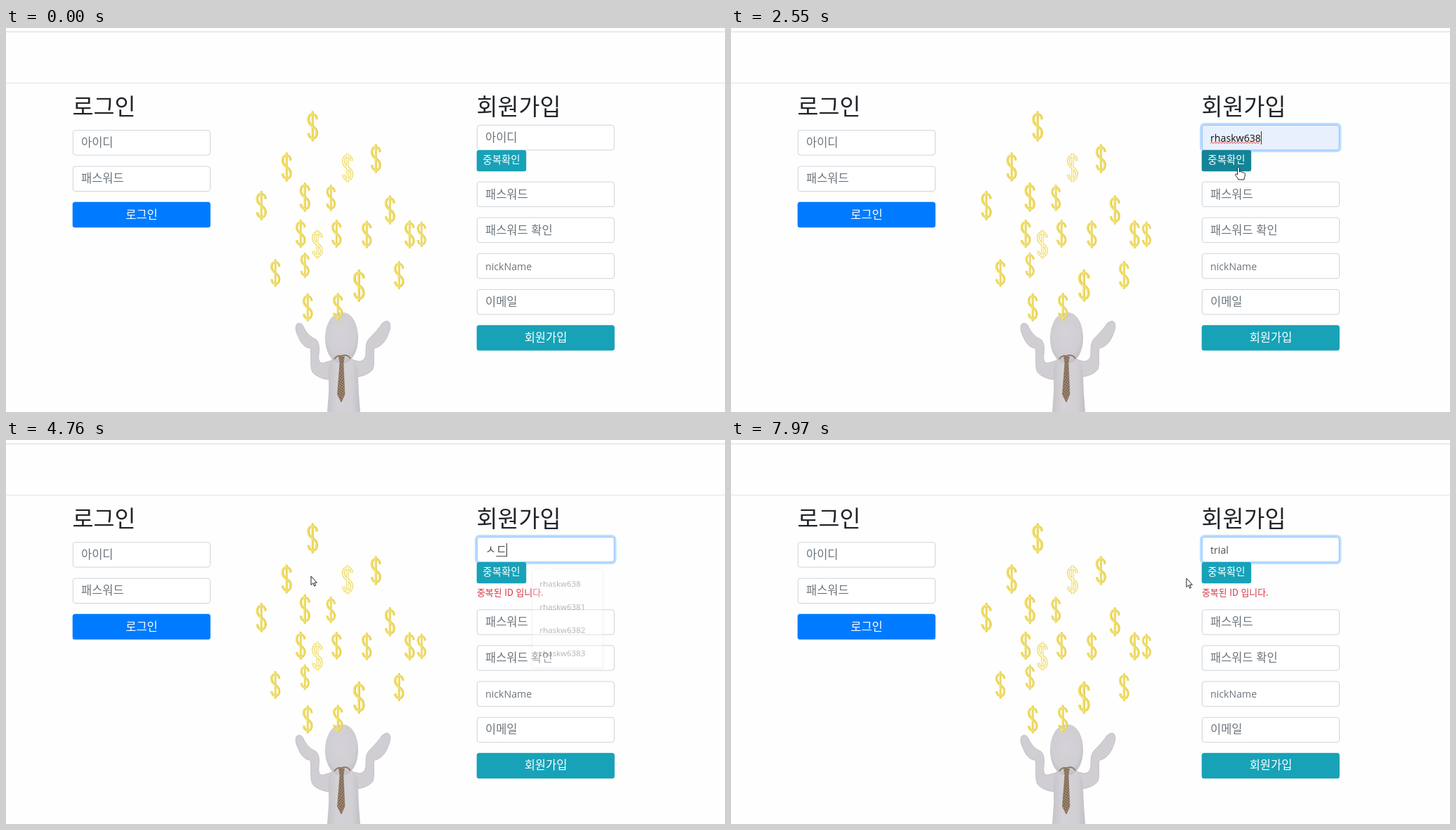
Animation of 1023x547 px, one loop 8 s. Source, as an HTML page:

```html
<!DOCTYPE html>
<html lang="ko">
<head>
<meta charset="utf-8">
<title>로그인 / 회원가입</title>
<style>
html, body { margin: 0; width: 100%; height: 100%; overflow: hidden; background: #fefefe; }
svg { display: block; width: 100%; height: 100%; }
text { font: 300 16.5px "Noto Sans CJK KR", "Noto Sans CJK JP", "Noto Sans CJK", sans-serif; fill: #212529; }
text.latin { font: 14.2px "Open Sans", "Noto Sans", sans-serif; }
text.title { font-size: 32.6px; }
text.hint { fill: #6c757d; }
text.label { fill: #fff; text-anchor: middle; }
text.small { font-size: 14.5px; }
text.error { font-size: 12.9px; fill: #d63343; }
text.item { font-size: 11.9px; }
text.item.ko { font-size: 13.2px; }
.box { fill: #fff; stroke: #ced4da; }
</style>
</head>
<body>
<svg id="stage" viewBox="0 0 1023 547">
  <defs>
    <radialGradient id="skin" cx=".48" cy=".42" r=".62">
      <stop offset="0" stop-color="#d5d3d7"/><stop offset=".7" stop-color="#d0ced2"/><stop offset="1" stop-color="#c0bdc3"/>
    </radialGradient>
    <linearGradient id="torso">
      <stop offset="0" stop-color="#c6c3c9"/><stop offset=".3" stop-color="#d4d2d6"/><stop offset=".75" stop-color="#d2d0d4"/><stop offset="1" stop-color="#c2bfc5"/>
    </linearGradient>
    <pattern id="weave" width="3" height="3" patternUnits="userSpaceOnUse" patternTransform="rotate(35)">
      <rect width="3" height="3" fill="#8a725e"/><rect width="1.5" height="1.5" fill="#bda98f"/><rect x="1.5" y="1.5" width="1.5" height="1.5" fill="#6a5341"/>
    </pattern>
    <path id="curl" d="M6.2-10C5.5-20-6.2-20-6.2-10C-6.2 1 6.2-1 6.2 10C6.2 20-5.5 20-6.2 10"/>
    <path id="bar" d="M0-22V22"/>
  </defs>

  <rect width="1023" height="547" fill="#fefefe"/>
  <path d="M0 5.5H1023" stroke="#dadbde"/>
  <path d="M0 78.5H1023" stroke="#e5e5e6"/>

  <g id="figure">
    <path d="M413 423C415 419 421 420 423 425C426 432 432 440 440 443C446 447 446 456 445 465C444 474 446 478 452 477C458 475 462 474 466 473L462 501C452 501 440 496 436 490C432 482 435 466 433 456C425 456 419 448 416 440C413 434 411 428 413 423Z
             M546 421C545 416 539 417 535 421C531 427 525 434 519 440C512 446 512 453 512 463C512 471 508 474 503 475C498 474 494 473 491 472L496 497C507 497 518 492 522 486C525 478 522 464 524 456C533 455 540 446 543 438C546 431 548 425 546 421Z" fill="#d0ced2" stroke="#c3c0c6"/>
    <path d="M464 471H493C502 478 501 500 502 520L504 547H457L459 520C460 500 456 480 464 471Z" fill="url(#torso)"/>
    <path d="M478 405C494 405 501 424 501 442C501 462 491 478 478 478C464 478 454 462 454 442C454 424 462 405 478 405Z" fill="url(#skin)"/>
    <path d="M467 472Q470 466 477 467Q486 464 490 471" fill="none" stroke="#8b705a" stroke-width="1.6"/>
    <path d="M473.5 468H481.5L480 477L482 522L477 533L471.5 522L475 477Z" fill="url(#weave)" stroke="#7a614d" stroke-width=".5"/>
  </g>
  <g id="dollars"></g>

  <g id="login"></g>
  <g id="signup">
    <g id="lower"></g>
    <text id="error" class="error" x="670" y="221.5">중복된 ID 입니다.</text>
    <rect id="idRing" x="668.5" y="136.5" width="198.5" height="39" rx="5" fill="none" stroke="#bfdeff" stroke-width="3"/>
    <rect id="idBox" class="box" x="670.3" y="138.4" width="195" height="35.4" rx="3.5"/>
    <rect id="selection" y="147" height="19" fill="#3390ff"/>
    <text id="idText" x="682" y="161.6"></text>
    <path id="squiggle" fill="none" stroke="#e5352c"/>
    <path id="underline" stroke="#495057"/>
    <path id="caret" stroke="#333"/>
    <rect id="checkRing" x="668.5" y="172.5" width="73" height="33" rx="5" fill="none" stroke="#8bd0dc" stroke-width="3"/>
    <rect id="check" x="669.7" y="174" width="70.5" height="30.2" rx="3"/>
    <text class="label small" x="705" y="193.4">중복확인</text>
  </g>
  <g id="menu"></g>

  <g id="cursor" stroke-linejoin="round">
    <path id="arrow" d="M0 0V12.5L2.8 9.8L4.8 14.2L6.6 13.3L4.7 9.2H8.4Z" fill="#fff" stroke="#222"/>
    <path id="hand" d="M-1.5 10V1C-1.5-1 1.5-1 1.5 1V6C3 5 4.5 5.5 4.5 6.5C6 6 7.5 6.5 7.5 7.5C9 7.2 9.5 8 9.5 9.5C9.5 13 8 14 8 17H0C-1 14-4 12-4.5 10C-4 8.5-2.5 9-1.5 10Z" fill="#fff" stroke="#222"/>
    <path id="beam" d="M-3-6H-1L0-5L1-6H3M0-5V5M-3 6H-1L0 5L1 6H3" fill="none" stroke="#222"/>
  </g>
</svg>
<script>
const LOOP = 8000, SHIFT = 22.6, INFO = '#17a2b8', INFO_DARK = '#138496';
const $ = id => document.getElementById(id);
const clamp = v => Math.max(0, Math.min(1, v));
const ramp = (t, start, length = 150) => clamp((t - start) / length);
const show = (id, on) => $(id).setAttribute('visibility', on ? 'visible' : 'hidden');
const set = (id, attrs) => { for (const k in attrs) $(id).setAttribute(k, attrs[k]); };
const isKorean = s => /[ㄱ-힣]/.test(s);
const fontOf = s => isKorean(s) ? 'ko' : 'latin';

const field = (x, y, hint) =>
  `<rect class="box" x="${x + .3}" y="${y + .4}" width="195.2" height="35.4" rx="3.5"/>
   <text class="hint ${fontOf(hint)}" x="${x + 12}" y="${y + 23.7}">${hint}</text>`;
const button = (x, y, label, fill, id) =>
  `<rect id="${id}" x="${x - .3}" y="${y}" width="196.2" height="36.4" rx="3.5" fill="${fill}"/>
   <text class="label" x="${x + 98}" y="${y + 23.7}">${label}</text>`;

$('login').innerHTML = '<text class="title" x="94.5" y="124">로그인</text>' +
  field(95, 145.3, '아이디') + field(95, 196.7, '패스워드') + button(95, 247.8, '로그인', '#007bff', 'enter');

const FIELDS = [[218.8, '패스워드'], [269.8, '패스워드 확인'], [321, 'nickName'], [372.2, '이메일']];
$('lower').innerHTML = FIELDS.map(([y, hint]) => field(670, y, hint)).join('') +
  button(670, 423.2, '회원가입', INFO, 'join');
$('signup').insertAdjacentHTML('afterbegin', '<text class="title" x="669.5" y="124">회원가입</text>');

// x, y, height, hollow
const DOLLARS = [
  [436, 140, 44], [399, 198, 42], [486, 199, 43, 1], [526, 186, 42], [425, 241, 43],
  [462, 242, 38], [363, 253, 43], [546, 259, 42], [419, 293, 41], [443, 308, 42, 1],
  [470, 293, 40], [513, 294, 40], [574, 294, 41], [591, 294, 37], [383, 349, 40],
  [425, 338, 37], [502, 367, 47], [559, 352, 41], [429, 398, 41], [472, 397, 40]];
$('dollars').innerHTML = DOLLARS.map(([x, y, h, hollow]) => {
  const layer = (color, width, dx = 0) => `<g stroke="${color}" transform="translate(${dx})">
    <use href="#bar" stroke-width="${width * .8}"/><use href="#curl" stroke-width="${width}"/></g>`;
  const layers = hollow
    ? layer('#ecd75e', 4.4) + layer('#fffbe2', 2)
    : layer('#dfc64a', 3.4, .4) + layer('#eeda58', 2.8, -.3) + layer('#f7eb9a', .8, -.8);
  return `<g fill="none" transform="translate(${x} ${y}) scale(${h / 45})">${layers}</g>`;
}).join('');

const USER = 'rhaskw638';
const TYPED = [
  [0, ''], [2050, USER], [4620, 'ㅅ'], [4690, 'ㅅㄷ'], [4910, 'ㅅㄷㄴ'], [5300, 'ㅅㄷ'], [5500, 'ㅅ'], [5630, ''],
  [5840, 't'], [6180, 'tr'], [6500, 'tri'], [6570, 'tria'], [7040, 'trial']];

// start, end, fade in, fade out, items
const MENUS = [
  [1440, 2330, 150, 100, [USER, USER + '1', 'test', USER + '2', USER + '3', 'ㅁㄴㅇㄹ']],
  [4140, 4805, 130, 130, [USER, USER + '1', USER + '2', USER + '3']],
  [5980, 6240, 60, 1, [USER, USER + '1', 'test', USER + '2', USER + '3']],
  [6240, 6730, 1, 130, ['test']]];

const PATH = [
  [330, 918, 532], [470, 840, 440], [610, 812, 280], [720, 815, 136], [810, 827, 171],
  [1910, 827, 171], [2050, 800, 203], [2260, 785, 205], [2540, 722, 199],
  [3230, 722, 199], [3350, 711, 231], [3430, 711, 231], [3520, 690, 238], [3720, 745, 222], [3970, 777, 161],
  [4100, 777, 161], [4480, 434, 194], [7640, 434, 194], [7960, 648, 197]];

function cursorAt(t) {
  const next = PATH.findIndex(key => key[0] > t);
  if (next < 1) return PATH[next ? PATH.length - 1 : 0].slice(1);
  const [t0, x0, y0] = PATH[next - 1], [t1, x1, y1] = PATH[next], k = (t - t0) / (t1 - t0);
  return [x0 + (x1 - x0) * k, y0 + (y1 - y0) * k];
}

function drawMenu(t) {
  const open = MENUS.find(([start, end]) => t >= start && t < end);
  if (!open) { $('menu').innerHTML = ''; return; }
  const [start, end, fadeIn, fadeOut, items] = open;
  const alpha = Math.min(ramp(t, start, fadeIn), clamp((end - t) / fadeOut));
  const width = items.length > 1 ? 104 : 56, height = 9 + 34 * items.length;
  const cx = 747 + width / 2, cy = 182 + height / 2, scale = .955 + .045 * alpha;
  const hovered = t >= 2050 && t < 2330;
  $('menu').innerHTML = `<g opacity="${alpha}" transform="translate(${cx} ${cy}) scale(${scale}) translate(${-cx} ${-cy})">
    <rect x="746" y="182" width="${width + 2}" height="${height + 2}" rx="4" fill="#000" opacity=".1"/>
    <rect x="747" y="181.5" width="${width}" height="${height + .5}" rx="4" fill="#fff" stroke="#d5d7da" stroke-width=".8"/>
    <path d="M761 182L768 175L775 182Z" fill="#fff"/>
    ${hovered ? `<rect x="747.5" y="186" width="${width - 1}" height="34" fill="#ececec"/>` : ''}
    ${items.map((s, i) => `<text class="item ${fontOf(s)}" x="758" y="${207.3 + 34 * i}">${s}</text>`).join('')}</g>`;
}

function drawIdField(t, cursorX) {
  const value = TYPED.findLast(key => key[0] <= t)[1];
  const focused = (t >= 1410 && t < 2740) || t >= 4100;
  const filled = value === USER;
  const focus = t < 4100 ? ramp(t, 1410) - ramp(t, 2740) : ramp(t, 4100);
  set('idRing', { opacity: focus });
  set('idBox', { style: `stroke:${focus > .5 ? '#80bdff' : '#ced4da'};fill:${filled ? '#e8f0fe' : '#fff'}` });

  const text = $('idText'), shown = value || '아이디';
  const selecting = t >= 4170 && t < 4620;
  text.setAttribute('class', fontOf(shown));
  text.style.fill = !value ? '#6c757d' : !filled ? '#495057' : selecting && cursorX < 690 ? '#fff' : '#111';
  if (text.textContent !== shown) text.textContent = shown;
  const end = 682 + (value ? text.getComputedTextLength() : 0);

  const left = Math.min(end, Math.max(682, cursorX));
  set('selection', { x: left, width: selecting ? end - left : 0 });

  show('squiggle', filled && focused && t >= 2260 && !selecting);
  let wave = 'M682 164.5';
  for (let x = 684, i = 0; x <= end; x += 2, i++) wave += `L${x} ${i % 2 ? 164.5 : 162.5}`;
  set('squiggle', { d: wave });

  show('underline', value && isKorean(value));
  set('underline', { d: `M${end - 15} 165.5H${end}` });
  show('caret', focused && t < 7640 && !selecting && !(t >= 2050 && t < 2260));
  const caretX = Math.round(end) + .5;
  set('caret', { d: `M${caretX} 147V166` });
}

function draw(t) {
  const [x, y] = cursorAt(t);
  const shift = t >= 2850 ? SHIFT : 0;
  const dragging = t >= 4100 && t < 4480;
  const inside = (top, height, width = 195) => !dragging && x >= 670 && x <= 670 + width && y >= top && y <= top + height;
  const overMenu = t >= 1910 && t < 2330 && y > 182;
  const overCheck = inside(174, 30, 70), overJoin = inside(423.2 + shift, 36);
  const overField = inside(138, 36) || FIELDS.some(([top]) => inside(top + shift, 36));
  const shape = dragging ? 'beam' : overMenu ? 'arrow' : overCheck || overJoin ? 'hand' : overField ? 'beam' : 'arrow';

  set('lower', { transform: `translate(0 ${shift})` });
  show('error', shift > 0);
  set('check', { fill: overCheck ? INFO_DARK : INFO });
  set('join', { fill: overJoin ? INFO_DARK : INFO });
  set('checkRing', { opacity: ramp(t, 2740) - ramp(t, 4100) });
  drawIdField(t, x);
  drawMenu(t);

  set('cursor', { transform: `translate(${x} ${y})` });
  for (const id of ['arrow', 'hand', 'beam']) show(id, t >= 330 && id === shape);
}

const began = performance.now();
(function frame() {
  draw((performance.now() - began) % LOOP);
  requestAnimationFrame(frame);
})();
</script>
</body>
</html>
```
